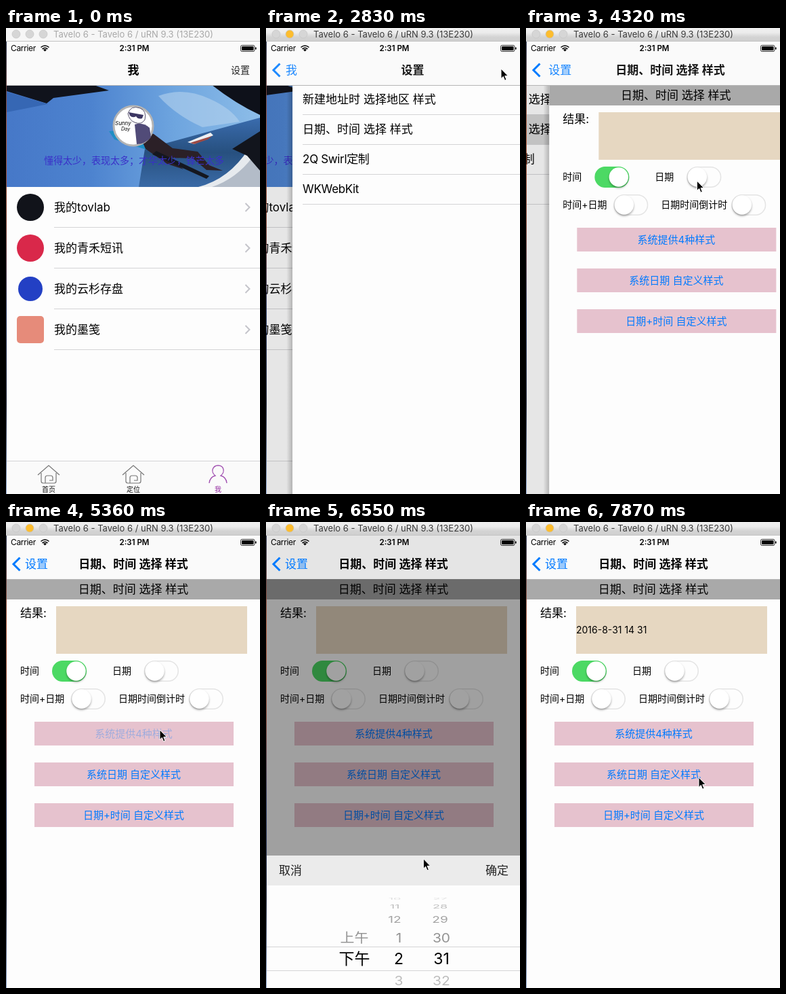
An HTML page for the animation above (8000 ms loop, 375x686 px).

```html
<!DOCTYPE html>
<html lang="zh">
<head>
<meta charset="utf-8">
<style>
html, body { margin: 0; width: 100%; height: 100%; overflow: hidden; background: #fdfdfd; }
svg { display: block; width: 375px; height: 686px; font: 17px Inter, 'Noto Sans CJK SC', 'Noto Sans CJK', sans-serif; }
.mid { text-anchor: middle; }
.bold { font-weight: 600; }
.small { font-size: 14px; }
.tight { letter-spacing: -.35px; }
.line { fill: none; stroke: #d4d4d6; }
.blue { fill: #007aff; }
.knob { fill: #fff; filter: drop-shadow(0 2px 1.5px #0005); }
</style>
</head>
<body>
<svg id="stage" viewBox="0 0 375 686"></svg>
<script>
const text = (x, y, s, cls = '', more = '') => `<text x="${x}" y="${y}" class="${cls}" ${more}>${s}</text>`;
const rect = (x, y, w, h, fill, more = '') => `<rect x="${x}" y="${y}" width="${w}" height="${h}" fill="${fill}" ${more}/>`;
const disc = (x, y, r, fill, more = '') => `<circle cx="${x}" cy="${y}" r="${r}" fill="${fill}" ${more}/>`;
const path = (d, fill, more = '') => `<path d="${d}" fill="${fill}" ${more}/>`;
const line = (x, y) => `<path class="line" d="M${x} ${y}H375"/>`;
const group = (id, body, more = '') => `<g id="${id}" ${more}>${body}</g>`;

const photo = rect(1, 84, 374, 150, 'url(#sky)')
  + path('M225 100Q262 86 300 104Q332 118 345 138L290 146Q250 128 225 100Z', '#b4d3ee', 'opacity=".6"')
  + path('M375 132L205 178L196 234H375Z', 'url(#sea)')
  + path('M1 84H130L152 92L70 103L60 111L1 93Z', '#10131c')
  + path('M1 94L62 112L1 124Z', '#3667b4')
  + path('M304 84H375V128Q340 112 304 84Z', '#0e111a')
  + path('M268 168L302 154L306 158L278 171Z', '#eef0f2')
  + path('M272 169L304 159L298 164L278 171Z', '#9c4a45')
  + path('M284 234Q330 222 358 178L375 190V234Z', '#e6eaee')
  + path('M304 234Q340 222 364 190L375 196V234Z', '#b3bcc8')
  + path('M334 178L375 152V210L356 188Z', '#12151d')
  + path('M152 152L170 150L214 168L210 180L160 164Z', '#1f8fc4')
  + path('M194 150L218 156L246 177L283 182L300 202L320 210L296 209L276 192L244 191L262 208L238 200L206 178Z', '#2b2027')
  + path('M222 181L300 218L296 222L216 186Z', '#15171f');

const avatar = disc(188, 144, 29, '#fff', 'stroke="#b4b4b4" stroke-width="3"')
  + path('M180 126Q184 113 198 118Q208 122 205 135Q200 143 190 139Q182 136 180 126Z', '#fff', 'stroke="#55506a"')
  + path('M181 124L203 128L201 133Q195 135 192 130Q187 133 183 129Z', '#3d3763')
  + path('M190 142Q202 138 212 147L214 161Q205 171 193 171Z', '#514b78')
  + text(161, 143, 'Sunny', '', 'font-size="8" font-style="italic"')
  + text(170, 151, 'Day', '', 'font-size="7" font-style="italic"');

const icons = [
  disc(36, 264, 20, '#11131a'), disc(36, 324, 20, '#d9284a'),
  disc(36, 384, 18, '#2340c4'), rect(16, 424, 40, 40, '#e68b7a', 'rx="5"')];
const links = ['tovlab', '青禾短讯', '云杉存盘', '墨笺'].map((name, i) => {
  const y = 264 + i * 60;
  return icons[i] + text(71, y + 6, '我的' + name) + line(71, y + 29.5)
    + path(`M353.5 ${y - 6}l6 6l-6 6`, 'none', 'stroke="#c4c4ca" stroke-width="2"');
}).join('');

const house = x => path(`M${x - 16} 658L${x} 644L${x + 16} 658M${x - 11} 655V667Q${x - 11} 670 ${x - 8} 670H${x + 8}Q${x + 11} 670 ${x + 11} 667V655`
  + `M${x - 5} 670V662Q${x - 5} 659 ${x - 2} 659H${x + 3}Q${x + 6} 659 ${x + 6} 662V666H${x + 1}`, 'none', 'stroke="#777" stroke-width="1.2"');
const tabs = rect(1, 637, 374, 49, '#fafafa') + line(1, 637.5) + house(63) + house(188)
  + path('M300 670Q301 661 309 659Q304 655 305 650Q307 644 313 644Q320 644 321 650Q322 655 317 659Q325 661 326 670', 'none', 'stroke="#a04fb0" stroke-width="1.3"')
  + ['首页', '定位', '我'].map((s, i) => text(63 + i * 125, 683, s, 'mid', `font-size="10" fill="${i == 2 ? '#92279f' : '#111'}"`)).join('');

const options = ['新建地址时 选择地区 样式', '日期、时间 选择 样式', '2Q Swirl定制', 'WKWebKit']
  .map((s, i) => text(16, 111 + i * 44, s, i > 1 ? 'tight' : '') + line(16, 127.5 + i * 44)).join('');

const toggle = (x, y, on) => `<rect x="${x + .75}" y="${y + .75}" width="49.5" height="29.5" rx="14.75" fill="${on ? '#4cd964' : '#fdfdfd'}" stroke="${on ? '#4cd964' : '#e4e4e4'}" stroke-width="1.5"/>`
  + disc(x + (on ? 35.5 : 15.5), y + 15.5, 14.2, '#fff', 'class="knob"');
const button = (y, s, id) => rect(42, y, 294, 35, '#e6c2ce') + text(188.5, y + 23, s, 'mid blue', `font-size="15" id="${id}"`);

const form = rect(1, 84, 374, 30, '#a9a9a9') + text(188, 105, '日期、时间 选择 样式', 'mid')
  + text(21, 140, '结果:') + rect(74, 124, 282, 70, '#e6d7c1') + text(74, 164, '2016-8-31 14 31', 'small', 'id="result"')
  + text(21, 224, '时间', 'small') + toggle(68, 204, true) + text(157, 224, '日期', 'small') + toggle(204, 204)
  + text(21, 265, '时间+日期', 'small') + toggle(96, 245) + text(166, 265, '日期时间倒计时', 'small') + toggle(270, 245)
  + button(294, '系统提供4种样式', 'press') + button(354, '系统日期 自定义样式', 'b2') + button(414, '日期+时间 自定义样式', 'b3');

// y, vertical squash, size, opacity, half-day, hour, minute
const wheel = [
  [555, .2, 18, .12, '', '10', '27'], [566, .45, 18, .25, '', '11', '28'], [585, .72, 19, .36, '', '12', '29'],
  [612, .9, 21, .42, '上午', '1', '30'], [643, 1, 23, 1, '下午', '2', '31'], [675, .9, 21, .25, '', '3', '32']
].map(([y, squash, size, alpha, ...cells]) => `<g transform="translate(0 ${y}) scale(1 ${squash})" font-size="${size}" opacity="${alpha}">`
  + cells.map((s, i) => text([130.5, 196, 259][i] - (squash < .8 ? [0, 6, 2][i] : 0), size * .36, s, 'mid')).join('') + '</g>').join('');
const sheet = rect(1, 491, 374, 195, '#fdfdfd') + rect(1, 491, 374, 44, '#ebebeb')
  + text(19, 519, '取消', '', 'fill="#222"') + text(324, 519, '确定', '', 'fill="#222"')
  + line(1, 625.5) + line(1, 660.5) + wheel;

const status = text(7, 34, 'Carrier', 'tight', 'font-size="12"') + text(189.5, 34, '2:31 PM', 'mid bold', 'font-size="11.5"')
  + path('M51.5 28.5Q57.5 23.5 63.5 28.5M53.5 31Q57.5 27.5 61.5 31', 'none', 'stroke="#000" stroke-width="1.6"') + path('M57.5 34.5L55 32Q57.5 30 60 32Z', '#000')
  + rect(346.5, 25.5, 20.5, 9, 'none', 'rx="2" stroke="#000" stroke-width=".8"') + rect(348, 27, 17.5, 6, '#000', 'rx="1"') + rect(368, 28.5, 1.6, 3, '#000');

const nav = rect(1, 20, 374, 64, '#fafafa') + rect(1, 20, 374, 64, '#000', 'id="navDim"') + path('M1 84.5H375', 'none', 'stroke="#b5b5b5"') + status
  + text(188, 68, '我', 'mid bold', 'id="title0"') + text(332, 67, '设置', 'small', 'id="right" fill="#222"')
  + text(188, 68, '设置', 'mid bold', 'id="title1"') + text(188, 68, '日期、时间 选择 样式', 'mid bold', 'id="title2"')
  + path('M20.5 52.5L11 62L20.5 71.5', 'none', 'id="chevron" stroke="#007aff" stroke-width="3"')
  + text(29, 68, '我', 'blue', 'id="back0"') + text(28, 68, '设置', 'blue', 'id="back1"');

const stops = list => list.map((c, i) => `<stop offset="${i / (list.length - 1)}" stop-color="${c}"/>`).join('');
const down = (id, list) => `<linearGradient id="${id}" x2="0" y2="1">${stops(list)}</linearGradient>`;
const shadow = rect(-8, 84, 9, 602, 'url(#shade)');

stage.innerHTML = `<defs>${down('bar', ['#f0f0f0', '#ececec', '#d3d3d3', '#cfcfcf'])}${down('sea', ['#3a6cae', '#27507f', '#3a6aa6'])}
  ${down('edge', ['#28324d', '#a54e30', '#7c3a2c', '#22335f', '#151a30', '#8ba3cc'])}
  <linearGradient id="sky">${stops(['#4678c8', '#4d83cf', '#6ea5df', '#8dbde8'])}</linearGradient>
  <linearGradient id="shade"><stop stop-opacity="0"/><stop offset="1" stop-opacity=".22"/></linearGradient></defs>`
  + group('me', rect(1, 84, 374, 602, '#fdfdfd') + photo + avatar
    + text(189, 200, '懂得太少，表现太多；才华太少，锋芒太多', 'mid small', 'fill="#3a2fc8"') + links + tabs)
  + rect(1, 84, 374, 602, '#000', 'id="shadeMe"')
  + group('settings', shadow + rect(1, 84, 374, 602, '#fdfdfd') + rect(1, 128, 374, 44, '#d5d5d5', 'id="picked"') + options)
  + rect(1, 84, 374, 602, '#000', 'id="shadeSettings"')
  + group('date', shadow + rect(1, 84, 374, 602, '#fdfdfd') + form)
  + nav + rect(1, 84, 374, 602, '#000', 'id="dim"') + group('sheet', sheet)
  + rect(0, 20, 1, 666, 'url(#edge)')
  + rect(0, 0, 375, 20, '#f6f6f6', 'id="bar0"') + path('M0 19.5H375', 'none', 'stroke="#c4c4c4"')
  + [15, 35, 55].map(x => disc(x, 9, 6, '#d6d6d6', `id="dot${x}" stroke="#c4c4c4" stroke-width=".7"`)).join('')
  + text(70, 14, 'Tavelo 6 - Tavelo 6 / uRN 9.3 (13E230)', '', 'font-size="13" id="caption"')
  + path('M0 0V14.5L3.3 11.4L5.6 17.2L8 16.2L5.7 10.6H10.3Z', '#000', 'id="cursor" stroke="#fff" stroke-width="1"');

const el = id => document.getElementById(id);
const fade = (id, v) => el(id).setAttribute('opacity', Math.max(0, Math.min(1, v)));
const move = (id, x, y = 0) => el(id).setAttribute('transform', `translate(${x} ${y})`);

// Bursts of motion: first step, last step, number of steps
const bursts = [[1350, 1650, 3], [2390, 3430, 8], [3580, 4610, 8], [4760, 4760, 1], [5210, 5960, 6], [6250, 7280, 8], [7420, 7870, 4]];
function hold(t) {
  const burst = bursts.filter(b => b[0] <= t).pop();
  if (!burst) return 0;
  const [from, to, n] = burst, step = (to - from) / (n - 1) || 1;
  return from + Math.min(n - 1, Math.floor((t - from + 4) / step)) * step;
}
function track(t, keys) {
  const i = keys.findIndex(k => k[0] > t);
  if (i < 0) return keys[keys.length - 1].slice(1);
  if (!i) return keys[0].slice(1);
  const a = keys[i - 1], b = keys[i], u = (t - a[0]) / (b[0] - a[0]);
  return a.slice(1).map((v, j) => v + (b[j + 1] - v) * u);
}
function push(t, start, lead) {
  if (t < start - 2) return 0;
  const w = lead + (t - start) * .012, p = 1 - (1 + w) * Math.exp(-w);
  return p > .99 ? 1 : p;
}
const late = p => (p - .1) / .9;

const mouse = [[1350, 364, 49], [1500, 352, 57], [1650, 347, 60], [2690, 347, 60], [3130, 300, 124], [3430, 279, 151], [3580, 277, 153],
  [4020, 277, 153], [4320, 252, 226], [4610, 227, 304], [4760, 227, 305], [5210, 227, 306], [5660, 227, 306], [5960, 168, 524],
  [6100, 168, 524], [7280, 339, 449], [7420, 339, 449], [7870, 255, 376]];
const lift = [[5360, 0], [5510, .3], [5660, .785], [5810, 1], [7420, 1], [7570, .7], [7720, .2], [7870, 0]];
const gloom = [[5360, 0], [5510, .26], [5660, .37], [7420, .37], [7570, .25], [7720, .08], [7870, 0]];
const press = [[5060, 1], [5210, .2], [5360, .3], [5510, .8], [5660, 1]];

function draw(t) {
  const p = push(t, 2390, .3), q = push(t, 4020, .485), active = t >= 2388;
  move('me', -112 * p);
  move('settings', 374 * (1 - p) - 112 * q);
  move('date', 374 * (1 - q));
  fade('settings', p ? 1 : 0);
  fade('date', q ? 1 : 0);
  fade('shadeMe', p * .1);
  fade('shadeSettings', q * .1);
  fade('picked', t >= 3725 ? 1 : 0);

  move('title0', -95 * p);
  fade('title0', 1 - 5 * p);
  fade('right', 1 - 5 * p);
  move('title1', 280 * (1 - p) - 95 * q);
  fade('title1', p * (1 - 3 * q));
  move('title2', 280 * (1 - q));
  fade('title2', q);
  fade('chevron', late(p));
  fade('back0', late(p) * (1 - 3 * q));
  move('back1', 60 * (1 - q));
  fade('back1', late(q));

  const [dark] = track(t, gloom);
  fade('dim', dark);
  fade('navDim', dark * .22);
  move('sheet', 0, 195 * (1 - track(t, lift)[0]));
  fade('press', track(t, press)[0]);
  fade('result', t >= 7420 ? 1 : 0);

  el('bar0').setAttribute('fill', active ? 'url(#bar)' : '#f6f6f6');
  el('dot35').setAttribute('fill', active ? '#fdbd2e' : '#d6d6d6');
  el('caption').setAttribute('fill', active ? '#3a3a3a' : '#a8a8a8');
  move('cursor', ...track(t, mouse));
  fade('cursor', t >= 1350 ? 1 : 0);
}

const begin = performance.now();
(function tick() {
  draw(hold((performance.now() - begin) % 8000));
  requestAnimationFrame(tick);
})();
</script>
</body>
</html>
```
